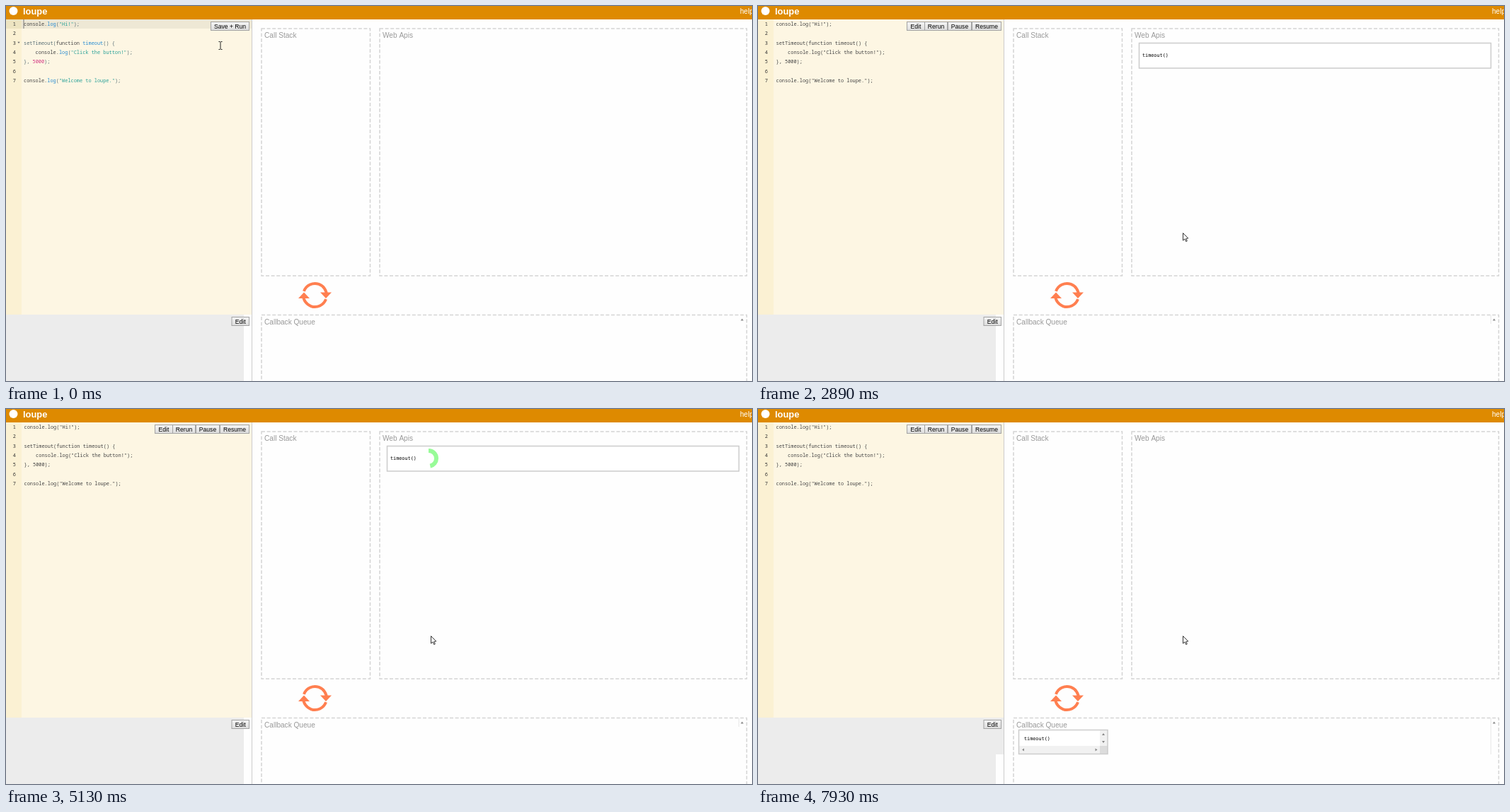
Animation of 1054x531 px, one loop 8000 ms. Source, as an HTML page with a canvas:

```html
<!DOCTYPE html>
<html lang="en">
<head>
<meta charset="utf-8">
<title>Event loop visualiser</title>
<style>
html, body { margin: 0; width: 100%; height: 100%; overflow: hidden; background: #fefefe; }
canvas { display: block; }
</style>
</head>
<body>
<canvas id="stage" width="1054" height="531"></canvas>
<script>
const ctx = document.getElementById('stage').getContext('2d');
const LOOP = 8000;
const SANS = '"Liberation Sans", Arial, sans-serif';
const CODE = '6.93px "Noto Sans Mono", monospace';
const CALL = '6.8px "DejaVu Sans Mono", monospace';
const CHAR = 4.16, LINE = 13.3;

// The screen refreshes in bursts: first time, last time, number of refreshes.
const BURSTS = [[150, 1070, 8], [1200, 1630, 4], [2190, 2460, 3], [2890, 3910, 9],
  [4060, 5010, 8], [5130, 6100, 8], [6250, 7210, 8], [7330, 7930, 5]];
const TICKS = [0];
for (const [from, to, n] of BURSTS)
  for (let i = 0; i < n; i++) TICKS.push(from + (to - from) * i / (n - 1));

const RUN = 410, TIMER_START = 2905, TIMER_LENGTH = 4770;
const QUEUED = TIMER_START + TIMER_LENGTH;

const GRAY = '#586e75', DARK = '#444', BLUE = '#268bd2', TEAL = '#2aa198', PINK = '#d33682';
const SOURCE = [
  [['console.', DARK], ['log', BLUE], ['(', GRAY], ['"Hi!"', TEAL], [');', GRAY]],
  [],
  [['setTimeout(', GRAY], ['function ', DARK], ['timeout', BLUE], ['() {', GRAY]],
  [['    console.', DARK], ['log', BLUE], ['(', GRAY], ['"Click the button!"', TEAL], [');', GRAY]],
  [['}, ', GRAY], ['5000', PINK], [');', GRAY]],
  [],
  [['console.', DARK], ['log', BLUE], ['(', GRAY], ['"Welcome to loupe."', TEAL], [');', GRAY]]
];

// Calls on the stack; marks are [line, characters].
const CALLS = [
  { from: 930, to: 1630, top: 350.5, marks: [[0, 19]], text: ['console.log("Hi!")'] },
  { from: 2300, to: 2890, top: 332, marks: [[2, 31], [3, 37], [4, 8]],
    text: ['setTimeout(function timeout()', '{ console.log("Click the', 'button!"); }, 5000)'] },
  { from: 3520, to: 4190, top: 350.5, marks: [[6, 33]], text: ['console.log("Welcome to', 'loupe.")'].slice(0, 2) }
];
CALLS[2].top = 341;

const MOUSE = [[150, 303, 50], [281, 311, 27], [544, 311, 27], [1070, 414, 115], [2190, 414, 115], [2460, 600, 321]];

function rect(x, y, w, h, color) {
  ctx.fillStyle = color;
  ctx.fillRect(x, y, w, h);
}

function frame(x, y, w, h, color = '#ccc', dash = []) {
  ctx.strokeStyle = color;
  ctx.lineWidth = 1.5;
  ctx.setLineDash(dash);
  ctx.strokeRect(x, y, w, h);
  ctx.setLineDash([]);
}

function text(str, x, y, font, color, align = 'left') {
  ctx.font = font;
  ctx.fillStyle = color;
  ctx.textAlign = align;
  ctx.fillText(str, x, y);
}

function shape(points, fill, stroke) {
  ctx.beginPath();
  points.forEach(([x, y]) => ctx.lineTo(x, y));
  ctx.closePath();
  ctx.fillStyle = fill;
  ctx.fill();
  if (stroke) {
    ctx.strokeStyle = stroke;
    ctx.lineWidth = 1;
    ctx.stroke();
  }
}

function arc(x, y, r, from, to, width, color) {
  ctx.beginPath();
  ctx.arc(x, y, r, from * Math.PI / 180, to * Math.PI / 180);
  ctx.strokeStyle = color;
  ctx.lineWidth = width;
  ctx.stroke();
}

// Small triangle pointing along (dx, dy).
function pointer(x, y, dx, dy, color = '#888', s = 2) {
  shape([[x + dx * s, y + dy * s], [x - dx * s / 2 + dy * s, y - dy * s / 2 + dx * s],
    [x - dx * s / 2 - dy * s, y - dy * s / 2 - dx * s]], color);
}

function button(label, x, y, w) {
  const shade = ctx.createLinearGradient(0, y, 0, y + 13);
  shade.addColorStop(0, '#f6f6f6');
  shade.addColorStop(1, '#dcdcdc');
  rect(x, y, w, 13, shade);
  ctx.strokeStyle = '#a3a3a3';
  ctx.lineWidth = 1;
  ctx.strokeRect(x + 0.5, y + 0.5, w - 1, 12);
  text(label, x + w / 2, y + 9.6, '8.6px ' + SANS, '#000', 'center');
}

function panel(title, x, y, w, h) {
  frame(x, y, w, h, '#d4d4d4', [5, 2.6]);
  text(title, x + 4, y + 13, '10.1px ' + SANS, '#999');
}

function editor(t, call) {
  const running = t >= RUN;
  rect(0, 19, 347, 418, '#fdf6e3');
  rect(0, 19, 22, 418, '#fbf1d3');
  if (!running) {
    rect(22, 19, 325, 13, '#eee8d5');
    rect(0, 19, 22, 13, '#ede4c1');
    rect(24.5, 19, 1, 13, '#777');
    pointer(18, 51.5, 0, 1, '#666', 1.6);
  }
  if (call) for (const [line, n] of call.marks) rect(25, 21 + line * LINE, n * CHAR, 9, '#f9d3bd');
  SOURCE.forEach((parts, i) => {
    const y = 28 + i * LINE;
    text(i + 1, 14, y, CODE, '#333', 'right');
    let column = 0;
    for (const [str, color] of parts) {
      text(str, (running ? 25.5 : 25) + column * CHAR, y, CODE, running ? '#444' : color);
      column += str.length;
    }
  });
  if (running) {
    button('Edit', 210, 22, 26);
    button('Rerun', 235, 22, 33);
    button('Pause', 268, 22, 34);
    button('Resume', 302, 22, 42);
  } else button('Save + Run', 289, 22, 55);
}

function callStack(call) {
  panel('Call Stack', 361, 32, 153.5, 350);
  if (!call) return;
  rect(368.5, call.top, 138.5, 374.5 - call.top, '#fff');
  frame(368.5, call.top, 138.5, 374.5 - call.top);
  call.text.forEach((str, i) => text(str, 376, call.top + 14.8 + i * 9.5, CALL, '#000'));
}

function webApis(t) {
  panel('Web Apis', 528, 32, 518.5, 350);
  if (t < 2890 || t >= QUEUED) return;
  rect(538.5, 52.5, 497, 35.5, '#fff');
  frame(538.5, 52.5, 497, 35.5);
  text('timeout()', 543, 72.2, CALL, '#000');
  const done = Math.max(0, t - TIMER_START) / TIMER_LENGTH;
  arc(597, 70, 11, -90, -90 + done * 360, 6, '#98fb98');
}

function loopIcon() {
  const coral = '#ff7f50';
  arc(436.5, 409.5, 16.5, 200, 360, 4, coral);
  arc(436.5, 409.5, 16.5, 20, 180, 4, coral);
  shape([[413, 414], [421, 405.5], [429, 414]], coral);
  shape([[444, 405.5], [460, 405.5], [452, 414]], coral);
}

function callbackQueue(t) {
  const queued = t >= QUEUED;
  if (t >= 2890) rect(1035, 438, 1, queued ? 51 : 12, '#e9e9e9');
  panel('Callback Queue', 361, 437.5, 685.5, 120);
  pointer(1040, 444.5, 0, -1);
  if (!queued) return;
  rect(368.5, 454.5, 125.5, 34, '#fff');
  rect(483, 455, 11, 23, '#f1f1f1');
  rect(369, 477, 114, 11, '#f1f1f1');
  rect(483, 477, 11, 11, '#dcdcdc');
  frame(368.5, 454.5, 125.5, 34);
  text('timeout()', 376, 469, CALL, '#000');
  pointer(488, 461, 0, -1);
  pointer(488, 471, 0, 1);
  pointer(375, 482.5, -1, 0);
  pointer(477.5, 482.5, 1, 0);
}

function mouse(t) {
  const next = MOUSE.findIndex(m => m[0] > t);
  const b = next < 0 ? MOUSE[MOUSE.length - 1] : MOUSE[next];
  const a = next < 0 ? b : MOUSE[Math.max(0, next - 1)];
  const u = a === b ? 0 : (t - a[0]) / (b[0] - a[0]);
  const ease = u * u * (3 - 2 * u);
  const x = a[1] + (b[1] - a[1]) * ease, y = a[2] + (b[2] - a[2]) * ease;
  if (y > 36 && x < 347) {
    rect(x - 0.5, y + 1, 1, 10, '#222');
    for (const end of [0, 11]) {
      rect(x - 2.5, y + end, 2, 1, '#222');
      rect(x + 0.5, y + end, 2, 1, '#222');
    }
    return;
  }
  const arrow = [[0, 0], [0, 10.5], [2.5, 8.3], [4.2, 12], [5.8, 11.3], [4.2, 7.8], [7.3, 7.5]];
  shape(arrow.map(([px, py]) => [x + 0.5 + px, y + 0.5 + py]), '#fff', '#333');
}

function draw(t) {
  const call = CALLS.find(c => t >= c.from && t < c.to);
  rect(0, 0, 1054, 531, '#fefefe');
  rect(0, 0, 1054, 19, '#de8a00');
  ctx.beginPath();
  ctx.arc(10.5, 7, 6, 0, 7);
  ctx.fillStyle = '#fff';
  ctx.fill();
  text('loupe', 24, 12, 'bold 12.9px ' + SANS, '#fff');
  text('help', 1037, 11, '10.1px ' + SANS, '#fff');
  editor(t, call);
  rect(0, 437, 336, 94, '#ececec');
  if (t >= QUEUED) rect(336, 437, 11, 52, '#ececec');
  rect(347, 19, 1, 512, '#ccc');
  button('Edit', 318.5, 440, 25.5);
  callStack(call);
  webApis(t);
  loopIcon();
  callbackQueue(t);
  mouse(t);
}

function tick() {
  const now = performance.now() % LOOP;
  draw(TICKS.filter(t => t <= now).pop());
  requestAnimationFrame(tick);
}
tick();
</script>
</body>
</html>
```
